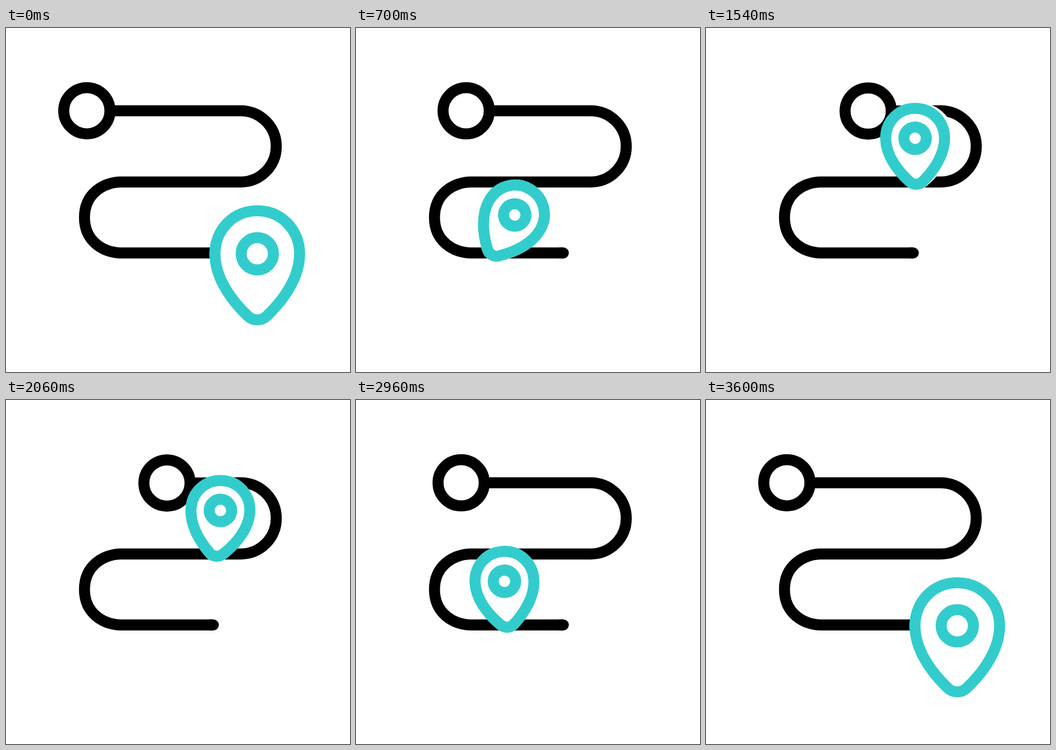
These frames come from a looping animation (640x640 px, 3620 ms). An HTML page:

```html
<!DOCTYPE html>
<html lang="en">
<head>
<meta charset="utf-8">
<title>Route</title>
<style>
html, body { margin: 0; width: 100%; height: 100%; overflow: hidden; background: #fff; }
svg { display: block; width: 100vw; height: 100vh; }
</style>
</head>
<body>
<svg viewBox="0 0 640 640" fill="none" stroke-width="20.5">
  <g stroke="#000">
    <path id="line" stroke-linejoin="round"/>
    <path d="M380 418.5H385.7" stroke-linecap="round"/>
    <circle id="start" r="43"/>
  </g>
  <path id="track" d="M467.5 537L386 418.5H212C181 417 146 397 146 352.5C146 308 181 288 212 286.5H436"/>
  <path id="back" fill="#fff" stroke="#fff"/>
  <g id="pin" stroke="#3cc">
    <path id="drop"/>
    <circle r="30"/>
  </g>
</svg>
<script>
const STEP = 20, STEPS = 181;
const SMALL = 0.696, WIDTH = 20.5, TIP = 117;
const el = id => document.getElementById(id);
const line = el('line'), start = el('start'), track = el('track');
const back = el('back'), pin = el('pin'), drop = el('drop');
const LENGTH = track.getTotalLength();

const DROP = 'M0 -80C-45 -80 -78.7 -44 -78.7 0C-78.7 42 -52 83 -18 115.5' +
  'C-8 125.5 8 125.5 18 115.5C52 83 78.7 42 78.7 0C78.7 -44 45 -80 0 -80Z';
drop.setAttribute('d', DROP);
back.setAttribute('d', DROP);

const linear = u => u;
const smooth = u => u * u * (3 - 2 * u);

// Keys are [step, value] pairs
const slide = [[0, 0], [89, 1], [180, 0]];
const travel = [[8, 0], [35, 275], [57, 496.5], [77, 705], [81.5, LENGTH],
  [98.5, LENGTH], [108, 655], [124, 492], [148, 248], [172, 0]];
const size = [[4, 1], [26, SMALL], [155, SMALL], [176, 1]];
const lean = [[9, 0], [34, 30], [58, 0], [71, -10], [84, 9], [94, 0],
  [122, 22.5], [137, 0], [142, 0], [163, -20], [180, 0]];
const lead = [[71, 0], [77, 5], [84, 0]];

function at(keys, n, ease) {
  if (n <= keys[0][0]) return keys[0][1];
  for (let i = 1; i < keys.length; i++) {
    const [a, va] = keys[i - 1], [b, vb] = keys[i];
    if (n <= b) return va + (vb - va) * ease((n - a) / (b - a));
  }
  return keys[keys.length - 1][1];
}

function place(node, p, angle, scale) {
  node.setAttribute('transform',
    `translate(${p.x} ${p.y}) rotate(${angle}) scale(${scale}) translate(0 ${-TIP})`);
  node.setAttribute('stroke-width', WIDTH / scale);
}

function draw(ms) {
  const n = Math.floor(ms / STEP) % STEPS;
  const k = at(slide, n, smooth);
  const x = 150.4 + 159.2 * k, y = 153.9 + 0.6 * k;
  start.setAttribute('cx', x);
  start.setAttribute('cy', y);
  line.setAttribute('d', `M${x + 43} ${y}L436.5 153.9A66.3 66.3 0 0 1 436.5 286.5H212` +
    'C181 288 146 308 146 352.5C146 397 181 417 212 418.5H385.7');

  const p = track.getPointAtLength(at(travel, n, linear));
  const angle = at(lean, n, smooth), scale = at(size, n, smooth);
  place(pin, p, angle, scale);
  place(back, p, angle + at(lead, n, smooth), scale);
}

function tick() {
  draw(performance.now());
  requestAnimationFrame(tick);
}
tick();
</script>
</body>
</html>
```
